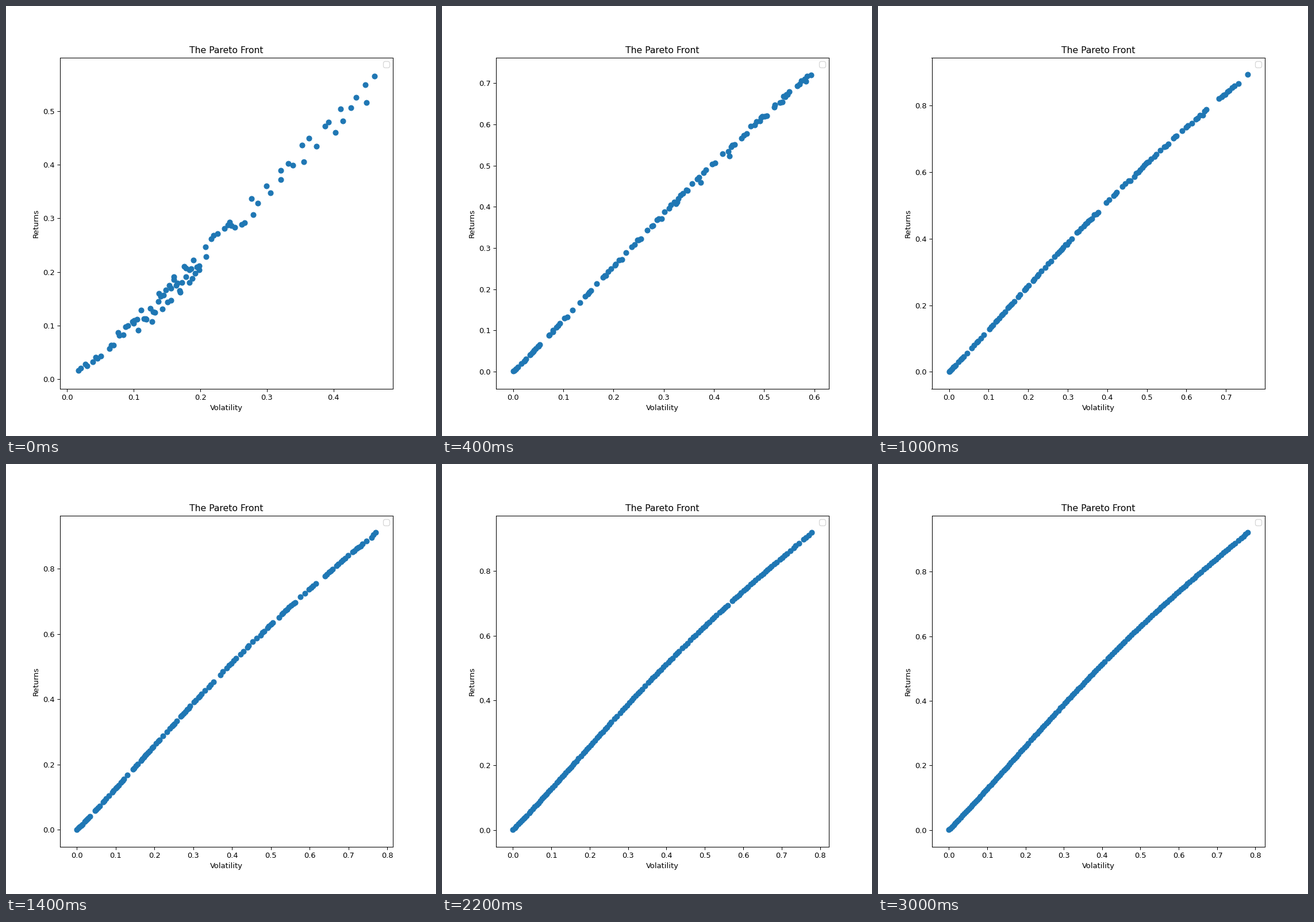
Animation of 748x748 px, one loop 3.2 s. Source, as a matplotlib script:

```python
import numpy as np
import matplotlib.pyplot as plt
from matplotlib.animation import FuncAnimation

SIZE, INCHES = 748, 8
FRAMES, STEP = 16, 200

# True front through a few (volatility, return) points
FRONT = np.polyfit(
    [0, 0.1, 0.2, 0.3, 0.4, 0.5, 0.6, 0.7, 0.78],
    [0, 0.1275, 0.26, 0.388, 0.513, 0.631, 0.739, 0.84, 0.9215], 4)


def front(x):
    return np.polyval(FRONT, x)


def reach(gen):
    """Highest volatility found so far."""
    return np.interp(gen, [0, 1, 2, 3, 5, 6, 8, 11, 13],
                     [0.461, 0.584, 0.594, 0.6535, 0.755,
                      0.77, 0.771, 0.7786, 0.7805])


def first_population(rng, n=93):
    """Wide cloud below the front, densest at low volatility."""
    u = np.linspace(0, 1, n)
    u[1:-1] += rng.uniform(-0.8, 0.8, n - 2) / n
    x = np.interp(u, [0, 0.15, 0.33, 0.62, 0.72, 0.81, 1],
                  [0.0173, 0.09, 0.14, 0.2, 0.25, 0.31, reach(0)])
    short = rng.uniform(0.015, 0.058, n)
    short[0] = 0.0375
    return x, front(x) - short * np.minimum(1, x / 0.13)


def later_population(rng, gen):
    """Points along the front; gaps and shortfall shrink with each step."""
    n = 100 + 3 * gen
    uneven = np.exp(-(gen - 1) / 7)
    gaps = 1 - uneven + uneven * rng.exponential(1, n)
    gaps *= np.linspace(0.8, 1.2, n)
    u = np.append(0, np.cumsum(gaps) / gaps.sum())
    low = 0.017 * np.exp(-1.7 * gen)
    x = low + (reach(gen) - low) * u
    spread = 0.036 * np.exp(-(gen - 1) / 2.2)
    return x, front(x) - spread * x * (0.4 + rng.exponential(0.6, n + 1))


def population(gen):
    rng = np.random.default_rng(20 + gen)
    x, y = later_population(rng, gen) if gen else first_population(rng)
    y[-1] = front(x[-1]) - 0.02 * np.exp(-max(gen - 1, 0) / 2)
    return np.column_stack([x, np.minimum(y, y[-1])])


def limits(values, pad):
    lo, hi = values.min(), values.max()
    return lo - pad * (hi - lo), hi + pad * (hi - lo)


POPULATIONS = [population(g) for g in range(FRAMES)]

fig, ax = plt.subplots(figsize=(INCHES, INCHES), dpi=SIZE / INCHES)
fig.subplots_adjust(left=0.125, right=0.9, bottom=0.11, top=0.88)
dots = ax.scatter([], [], s=46, color="#1f77b4")
ax.set_title("The Pareto Front")
ax.set_xlabel("Volatility")
ax.set_ylabel("Returns")
ax.legend([], [], loc="upper right")


def draw(gen):
    points = POPULATIONS[gen]
    pad = 0.0565 + 0.006 * np.exp(-gen / 2)
    ax.set_xlim(limits(points[:, 0], pad + 0.001))
    ax.set_ylim(limits(points[:, 1], pad))
    dots.set_offsets(points)
    return (dots,)


anim = FuncAnimation(fig, draw, frames=FRAMES, interval=STEP,
                     repeat=True, repeat_delay=0, blit=False)
plt.show()
```
